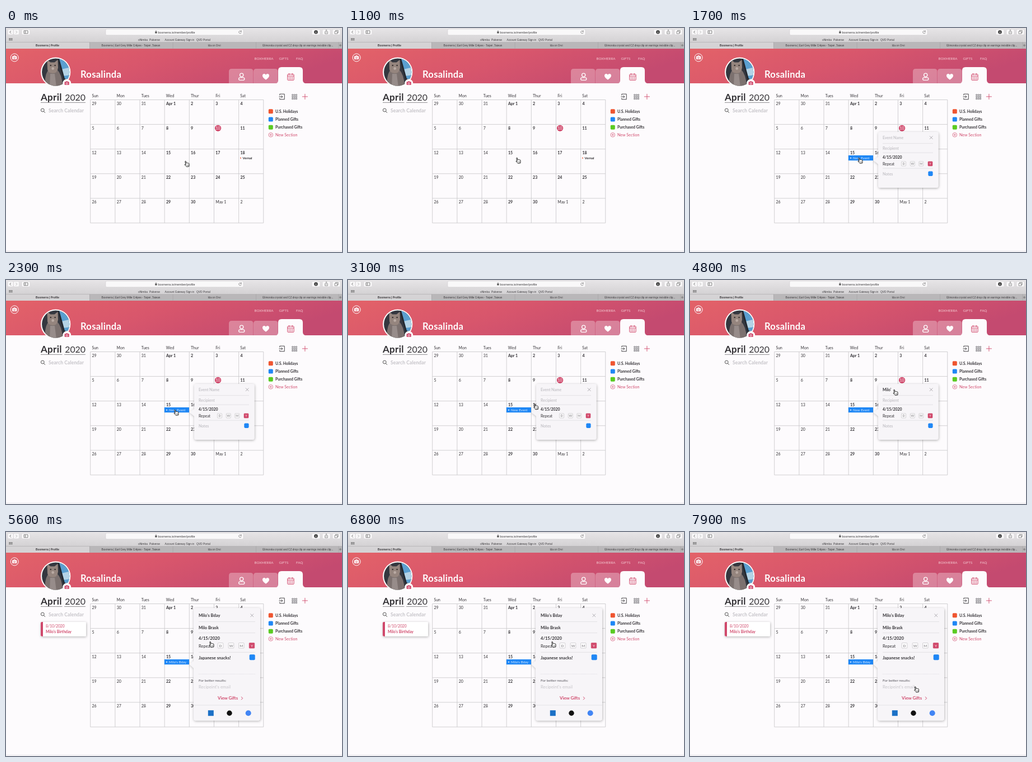
An HTML page for the animation above (8 s loop, 600 px wide and 401 px high).

```html
<!DOCTYPE html>
<html lang="en">
<head>
<meta charset="utf-8">
<title>Gift calendar</title>
<style>
html, body { margin: 0; width: 100%; height: 100%; overflow: hidden; background: #fdfbfd; }
svg { display: block; width: 100vw; height: 100vh; font-family: Lato, sans-serif; }
text { white-space: pre; transform: translateY(.4px); }
.ui { font-family: "Liberation Sans", Arial, sans-serif; }
</style>
</head>
<body>
<svg id="stage" viewBox="0 0 600 401"></svg>
<script>
const INK = '#333135', PINK = '#d0486b', MUTE = '#c5c3c8', BLUE = '#1f87f5', LINE = '#dcdadd';
const EVENT = "Milo's Bday";

const text = (x, y, str, size, fill = INK, weight = 400, extra = '') =>
  `<text x="${x}" y="${y}" font-size="${size}" fill="${fill}" font-weight="${weight}" ${extra}>${str}</text>`;
const ui = (x, y, str, size = 4.9, weight = 400, anchor = 'start') =>
  text(x, y, str, size, '#3c3a3d', weight, `class="ui" text-anchor="${anchor}"`);
const rect = (x, y, w, h, fill, r = 0, extra = '') =>
  `<rect x="${x}" y="${y}" width="${w}" height="${h}" rx="${r}" fill="${fill}" ${extra}/>`;
const circle = (x, y, r, fill, extra = '') =>
  `<circle cx="${x}" cy="${y}" r="${r}" fill="${fill}" ${extra}/>`;
const line = (d, stroke, width = 1, extra = '') =>
  `<path d="${d}" fill="none" stroke="${stroke}" stroke-width="${width}" ${extra}/>`;
const shape = (d, fill, extra = '') => `<path d="${d}" fill="${fill}" ${extra}/>`;
const group = (id, body) => `<g id="${id}">${body}</g>`;
const each = (list, fn) => list.map(fn).join('');

function browserBar() {
  const button = (x, w) => rect(x, 2.5, w, 9.5, '#f8f7f8', 1.8, 'stroke="#c9c7c9" stroke-width=".4"');
  const tabs = [
    'Boxmerra | Profile',
    'Boxmerra | Earl Grey Mille Crêpes - Taipei ,Taiwan',
    'Ida on Orvi',
    'Glimorska crystal and CZ drop clip on earrings invisible clip...'
  ];
  return rect(0, 0, 600, 26, 'url(#bar)')
    + button(3, 10) + button(13.5, 10) + button(28, 15) + button(546, 15) + button(565, 14) + button(583, 14)
    + line('M9 5 6.8 7.3 9 9.6', '#555', .8) + line('M17.5 5 19.7 7.3 17.5 9.6', '#aaa', .8)
    + line('M32 4.8h7v5h-7zM34.4 4.8v5', '#555', .7)
    + rect(178, 2, 246, 10.8, '#f9f8f9', 2, 'stroke="#c5c3c5" stroke-width=".4"')
    + rect(266.2, 6.6, 3.4, 3, '#555', .4) + line('M267 6.7v-1a.9.9 0 0 1 1.8 0v1', '#555', .6)
    + ui(271.5, 9.2, 'boxmerra.io/member/profile', 5.4)
    + line('M420 6.2A2.3 2.3 0 1 0 420.3 8M420.3 4.4v2h-2', '#555', .6)
    + circle(553.5, 7.3, 3.2, '#333') + line('M553.5 5.4v3.4M552.2 7.6l1.3 1.3 1.3-1.3', '#fff', .6)
    + line('M570.7 6.3h-1v4h4.6v-4h-1M572 8.4v-5M570.8 4.5 572 3.3l1.2 1.2', '#555', .6)
    + line('M587 6h4.6v4.2H587zM588.6 6V4.4h4.6v4.2h-1.6', '#555', .6)
    + each([0, 1, 2, 3, 4, 5], i => rect(5.4 + i % 3 * 2.2, 18.3 + (i / 3 | 0) * 2.3, 1.6, 1.7, '#666'))
    + ui(236, 22.4, 'oNimba') + ui(256, 22.4, 'Palverse')
    + ui(283.5, 22.4, 'Account Gateway Sign-in', 4.7) + ui(340, 22.4, 'QVD Portal')
    + rect(0, 25.5, 600, 11.5, '#b9b7b9') + rect(0, 25.5, 149, 11.5, '#d5d3d5')
    + line('M0 25.5H600', '#a9a7a9', .5)
    + line('M149.5 25.5v11M298 25.5v11M446.5 25.5v11M594 25.5v11', '#9f9d9f', .5)
    + each(tabs, (label, i) => ui(74 + i * 149, 32.6, label, i ? 4.7 : 4.9, i ? 400 : 700, 'middle'))
    + line('M597 28.8v4.6M594.7 31.1h4.6', '#555', .6);
}

function camera(x, y, disc, body) {
  return circle(x, y, 7, disc, 'stroke="#fff"')
    + shape(`M${x - 3.8} ${y - 2.2}h2l.8-1.2h2l.8 1.2h2v5h-7.6z`, body, `stroke="${body}" stroke-width=".6" stroke-linejoin="round"`)
    + circle(x, y + .3, 1.5, body, `stroke="${disc}" stroke-width=".8"`);
}

function header() {
  const tab = (x, top) => shape(`M${x} 99V${top + 5}q0-5 5-5h33.5q5 0 5 5V99z`, '#fff', 'fill-opacity=".3"');
  return rect(0, 37, 600, 62, 'url(#head)')
    + tab(398, 73) + tab(442, 73)
    + shape('M480 99.5q6 0 6-6V76q0-6 6-6h32q6 0 6 6v17.5q0 6 8 6z', '#fdfbfd')
    + circle(420.7, 84.2, 3.1, 'none', 'stroke="#fff" stroke-width="1.3"')
    + rect(415.6, 88.8, 10.3, 4.6, 'none', 2.3, 'stroke="#fff" stroke-width="1.3"')
    + shape('M464 92.7C459.4 89.2 458 87.4 458 85.2C458 81.8 462.4 80.9 464 83.9C465.6 80.9 470 81.8 470 85.2C470 87.4 468.6 89.2 464 92.7z', '#fff')
    + rect(502.7, 82.8, 11.4, 10.6, 'none', 1, `stroke="${PINK}"`)
    + line('M502.7 86h11.4M505.5 81v3M511.3 81v3', PINK, 1)
    + each([0, 1, 2, 3, 4, 5], i => rect(504.7 + i % 3 * 2.9, 87.8 + (i / 3 | 0) * 2.6, 1.6, 1.4, PINK))
    + each([[443.5, 'BOXMERRA'], [487.5, 'GIFTS'], [518, 'FAQ']], ([x, s]) => text(x, 56.2, s, 6.2, '#f4cbd3'))
    + camera(15.2, 53, '#dc5f6a', '#fff')
    + circle(88.7, 79, 26.6, '#fff')
    + `<g clip-path="url(#face)">`
    + rect(62, 52, 54, 54, '#34373f') + shape('M93 52h23v42L103 90z', '#5b9fd0')
    + shape('M99 74l17-4v14l-14 2z', '#b4d3e6') + line('M93 52 104 92', '#22262d', 2.5)
    + shape('M70 106Q68 82 77 74h14q10 10 10 32z', '#7c716f')
    + shape('M74 74 73.5 57l6 4.5h7l6-4.5.5 14q-1 10-9.5 10t-9.5-7z', '#95857e')
    + circle(79.8, 67, 1.3, '#37302f') + circle(87.6, 67, 1.3, '#37302f') + circle(83.7, 72.5, 2.4, '#b9aaa3')
    + shape('M79 82h8l3 24H78z', '#978c8a') + '</g>'
    + camera(108.7, 98.8, '#fff', PINK)
    + text(133, 88.4, 'Rosalinda', 16.5, '#fff', 700, 'letter-spacing=".3"');
}

function calendar() {
  const x0 = 150.7, y0 = 128.5, step = 44.15, height = 44.1;
  let out = '', grid = '';
  for (let i = 0; i < 8; i++) grid += `M${x0 + i * step} ${y0}v${height * 5}`;
  for (let i = 0; i < 6; i++) grid += `M${x0} ${y0 + i * height}h${step * 7}`;
  out += line(grid, '#c6c4c7', .8);
  ['Sun', 'Mon', 'Tues', 'Wed', 'Thur', 'Fri', 'Sat'].forEach((day, i) =>
    out += text(153.4 + i * step, 123.4, day, 6.8, INK, 400, 'letter-spacing=".15"'));
  for (let i = 0; i < 35; i++) {
    const col = i % 7, row = i / 7 | 0, n = i - 2;
    const label = n < 1 ? n + 31 : n === 1 ? 'Apr 1' : n === 31 ? 'May 1' : n > 31 ? n - 30 : n;
    const x = 153.5 + col * step, y = 137.6 + row * height;
    if (n === 10) out += circle(378.6, 179.3, 5.6, PINK) + text(378.6, 181.5, n, 7, '#fff', 400, 'text-anchor="middle"');
    else out += text(x, y, label, 7, INK, col > 2 && n < 31 ? 700 : 400);
  }
  return out + circle(419, 232.8, 1, '#ef5a33') + text(422.5, 234.6, 'Vernal', 6, INK, 700);
}

function sides() {
  const legend = [['U.S. Holidays', '#ef5530'], ['Planned Gifts', BLUE], ['Purchased Gifts', '#5acb22']];
  return text(62, 129.6, 'April', 17, INK, 700, 'letter-spacing=".3"') + text(105.3, 129.6, '2020', 15.8)
    + line('M62 133.4h38.5M104 133.4h38', '#77757a', .8)
    + circle(65.3, 147, 2.9, 'none', 'stroke="#444" stroke-width=".9"') + line('M67.4 149.2l2.5 2.6', '#444', 1)
    + text(76, 150.6, 'Search Calendar', 8.5, MUTE, 700, 'letter-spacing=".12"')
    + line('M488.8 120.6v-2.4h8.4v9.6h-8.4v-2.4M487.5 123h6.4M491.7 120.8l2.2 2.2-2.2 2.2', INK, .9)
    + each([...Array(9).keys()], i => rect(510.7 + i % 3 * 3.4, 118.8 + (i / 3 | 0) * 3.4, 2.1, 2.1, 'none', .3, 'stroke="#55535a" stroke-width=".7"'))
    + line('M533.9 117.9v10M528.9 122.9h10', PINK, .9)
    + each(legend, ([s, c], i) => rect(468.8, 145.3 + i * 14.2, 8, 8, c, 1.6) + text(481, 151.5 + i * 14.2, s, 6.9, INK, 700))
    + circle(472.8, 191.3, 3.8, 'none', `stroke="${PINK}" stroke-width=".7"`)
    + line('M472.8 189.3v4M470.8 191.3h4', PINK, .7)
    + text(481, 193.6, 'New Section', 6.9, PINK, 400, 'letter-spacing=".1"');
}

const panel = (x, y, w, h) => `<g filter="url(#shade)">${rect(x, y, w, h, '#f7f5f8', 4)}`
  + shape(`M${x + .5} 231 327.5 236.5 ${x + .5} 244z`, '#f7f5f8') + '</g>';
const cross = (x, y) => line(`M${x - 2.8} ${y - 2.8}l5.6 5.6m0-5.6l-5.6 5.6`, '#918f94', .7);
const repeat = (centers, y, s) => each(centers, (x, i) => {
  const on = i === 3;
  return rect(x - s / 2, y - s / 2, s, s, on ? PINK : '#fcfbfc', 1, `stroke="${on ? PINK : '#bbb9bd'}" stroke-width=".6"`)
    + text(x, y + s * .22, 'DWMY'[i], s * .68, on ? '#fff' : '#77757a', 400, 'text-anchor="middle"');
});

function smallPopup() {
  return panel(336, 186, 107.5, 100)
    + `<text id="field" x="344" y="199" font-size="6.9" font-weight="700"></text>` + cross(430.7, 196.2)
    + line('M344 206.7h90M344 223.2h90M344 251.2h90', LINE, .7)
    + text(344, 217.5, 'Recipient', 6.9, MUTE, 700)
    + text(344, 233.5, '4/15/2020', 6.9, INK, 700)
    + text(344, 245.3, 'Repeat', 6.9)
    + repeat([381.5, 397.3, 412.8, 429], 243, 8)
    + text(344, 263.9, 'Notes', 6.9, MUTE, 700) + rect(425.3, 256.6, 8.3, 8.3, BLUE, 1.8);
}

function largePopup() {
  return panel(335, 136, 119, 201.5)
    + text(344, 151.8, EVENT, 7.5, INK, 700) + cross(439.3, 149.3)
    + text(344, 173.2, 'Milo Brask', 7.5, INK, 700)
    + text(344, 192.3, '4/15/2020', 7.6, INK, 700)
    + text(344, 206.3, 'Repeat', 7.6)
    + repeat([383, 402, 420.3, 439], 203.3, 9.6)
    + text(344, 227.9, 'Japanese snacks!', 7.6, INK, 700) + rect(434.7, 219.2, 10, 10, BLUE, 2)
    + line('M344 160.5h101M344 180.6h101M344 215.3h101', LINE, .7)
    + line('M344 254.3h101', '#cfcdd0', .6, 'stroke-dasharray="1 1"')
    + text(344, 267.4, 'For better results:', 6.4, '#55535a')
    + text(344, 279.6, "Recipeint's email", 7.6, MUTE, 400, 'letter-spacing=".1"')
    + text(378, 300.1, 'View Gifts', 7.8, PINK, 700) + line('M420 294.9l2.7 2.7-2.7 2.7', PINK, 1)
    + line('M335 310h119', LINE, .7)
    + rect(360.8, 319.2, 10, 10, '#1b70c6') + circle(399, 324.2, 4.7, '#111') + circle(432.7, 324.2, 5, '#4285f4');
}

const card = () => rect(62, 161, 81, 25.7, '#fff', 2, 'filter="url(#shade)"')
  + shape('M66 161v25.7h-2q-2 0-2-2v-21.7q0-2 2-2z', PINK)
  + text(71, 171, '8/10/2020', 6.8, PINK) + text(71, 180.9, "Milo's Birthday", 6.9, PINK, 700);
const chip = () => rect(282.8, 228, 44.2, 9.2, BLUE) + circle(287, 232.7, 1, '#fff')
  + `<text id="label" x="291" y="234.6" font-size="6" fill="#d6e9ff" letter-spacing=".1"></text>`;
const hand = `<g transform="translate(1 .3) rotate(-8)">`
  + shape('M-2.6-4.4c0-1.2 1.6-1.2 1.7 0l.2 3c.6-.6 1.4-.4 1.5.2c.5-.5 1.3-.3 1.5.3c.8-.3 1.5.1 1.5.9l.1 1.6c0 1.2-.7 1.8-.7 3.4h-4.4c-.2-1.5-1.8-2.1-2.7-3.8c-.4-.9.6-1.4 1.3-.7l.6.7z',
    '#fff', 'stroke="#111" stroke-width=".9" stroke-linejoin="round"')
  + line('M-.2 1.6v2M1.1 1.6v2M2.3 1.6v2', '#111', .4) + '</g>';

const stage = document.getElementById('stage');
stage.innerHTML = `<defs>
  <linearGradient id="bar" x2="0" y2="1"><stop stop-color="#e7e5e7"/><stop offset="1" stop-color="#d3d1d3"/></linearGradient>
  <linearGradient id="head" x2="1" y2=".3"><stop stop-color="#e36268"/><stop offset=".5" stop-color="#d8566c"/><stop offset="1" stop-color="#c44a70"/></linearGradient>
  <clipPath id="face"><circle cx="88.7" cy="79" r="24.6"/></clipPath>
  <filter id="shade" x="-20%" y="-20%" width="140%" height="150%"><feDropShadow dx=".6" dy="1.2" stdDeviation="2.2" flood-opacity=".3"/></filter>
</defs>` + rect(0, 0, 600, 401, '#fdfbfd') + rect(0, 398, 600, 3, '#f4f2f5')
  + header() + browserBar() + calendar() + sides()
  + group('card', card()) + group('chip', chip()) + group('small', smallPopup())
  + group('large', largePopup()) + group('cursor', hand);

const el = id => document.getElementById(id);
const show = (id, on) => el(id).setAttribute('display', on ? 'inline' : 'none');

// Cursor stops: time, x, y
const stops = [
  [0, 322, 243], [900, 303, 237], [2600, 303, 237], [3600, 366, 216],
  [3800, 366, 216], [4200, 366, 201], [7200, 366, 201], [7800, 403.5, 281.5], [8000, 403.5, 281.5]
];
function cursorAt(t) {
  const i = stops.findIndex(s => s[0] > t);
  const [t0, x0, y0] = stops[i - 1], [t1, x1, y1] = stops[i];
  const p = (t - t0) / (t1 - t0), e = p * p * (3 - 2 * p);
  return [x0 + (x1 - x0) * e, y0 + (y1 - y0) * e];
}

const OPEN = 1500, TYPE = 4300, SAVED = 5500;
function draw(now) {
  const t = Math.floor(now % 8000 / 100) * 100;
  const typed = EVENT.slice(0, Math.max(0, (t - TYPE) / 100));
  const saved = t >= SAVED;
  show('chip', t >= OPEN);
  show('small', t >= OPEN && !saved);
  show('large', saved);
  show('card', saved);
  el('label').textContent = saved ? EVENT : 'New Event';
  el('field').textContent = typed || 'Event Name';
  el('field').setAttribute('fill', typed ? INK : MUTE);
  el('cursor').setAttribute('transform', `translate(${cursorAt(t)})`);
}

const start = performance.now();
function tick() {
  draw(performance.now() - start);
  requestAnimationFrame(tick);
}
tick();
</script>
</body>
</html>
```
